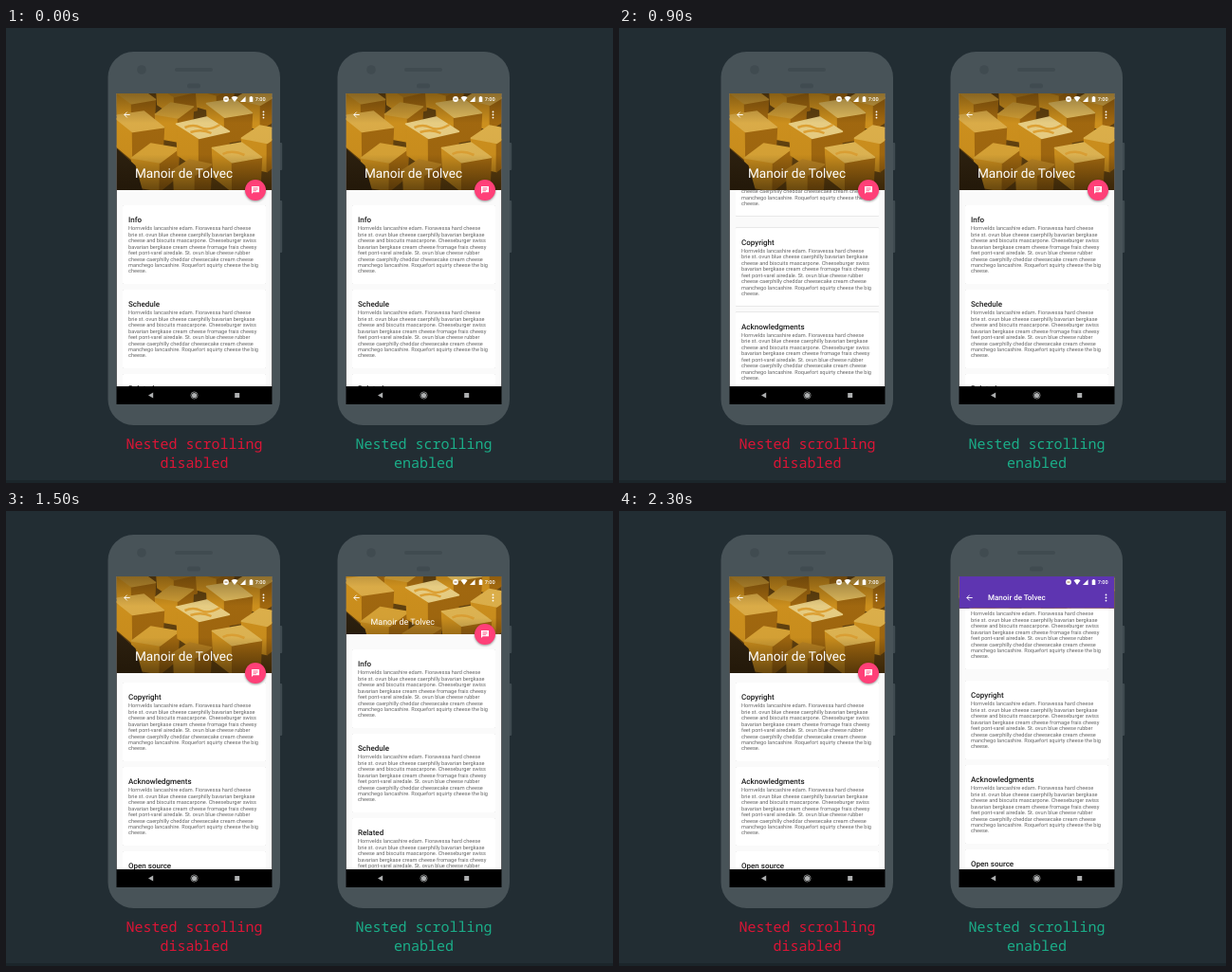
An HTML page for the animation above (2400 ms loop, 640 by 480 pixels).

```html
<!DOCTYPE html>
<html lang="en">
<head>
<meta charset="utf-8">
<title>Nested scrolling</title>
<style>
html, body { margin: 0; width: 100%; height: 100%; overflow: hidden; background: #222d33; }
svg { display: block; overflow: hidden; }
text { font-family: Roboto, sans-serif; text-rendering: geometricPrecision; }
.label { font: 15px "Roboto Mono", "Noto Sans Mono", monospace; text-anchor: middle; }
.card rect { fill: #fff; filter: drop-shadow(0 .6px .7px #0005); }
.card .name { font-size: 8px; font-weight: 500; fill: #1c1c1c; }
.card .body { font-size: 5.6px; fill: #666; }
.fab circle { fill: #ff4078; filter: drop-shadow(0 1px 1.2px #0006); }
</style>
</head>
<body>
<svg id="stage" width="640" height="480" viewBox="0 0 640 480"></svg>
<script>
const TITLE = 'Manoir de Tolvec';
const SECTIONS = ['Info', 'Schedule', 'Related', 'Copyright', 'Acknowledgments', 'Open source'];
const BODY = [
  'Hornvelds lancashire edam. Fioravessa hard cheese',
  'brie st. elmo blue cheese caerphilly bavarian bergkase',
  'cheese and biscuits mascarpone. Cheeseburger swiss',
  'bavarian bergkase cream cheese fromage frais cheesy',
  'feet pont-varel airedale. St. elmo blue cheese rubber',
  'cheese caerphilly cheddar cheesecake cream cheese',
  'manchego lancashire. Roquefort squirty cheese the big',
  'cheese.'
].map(line => line.replace(/elmo/g, 'ovun'));

// Scroll distance per 100 ms, from the start of each gesture
const STEP = 100, LOOP = 2400, RIGHT_START = 13;
const LEFT = [0, 0, 0, 0, 6, 52, 118, 177, 221, 249.5, 265, 273, 277, 279];
const RIGHT = [0, 8, 41, 95, 145, 186.5, 217, 241, 259, 272, 281];
const HEAD = 102, BAR = 33.5;

const clamp = (v, a = 0, b = 1) => Math.min(b, Math.max(a, v));
const mix = (a, b, k) => a + (b - a) * k;

function cube(x, y, w, h, lean, top = '#edc15a') {
  const d = w * .4;
  const face = (fill, pts) => `<polygon fill="${fill}" stroke="${fill}" stroke-width="1.5" stroke-linejoin="round" points="${pts}"/>`;
  const l = [x - w, y + d - lean], r = [x + w, y + d + lean], c = [x - lean, y + 2 * d];
  const down = ([px, py]) => [px * .94 + x * .06, py + h];
  return face('#d7971f', [l, c, down(c), down(l)]) +
    face('#a96d10', [c, r, down(r), down(c)]) +
    face(top, [[x + lean, y], r, c, l]);
}

const photo = `<rect width="164" height="104" fill="#654410"/>` +
  cube(64, -14, 22, 20, 3, '#c08722') + cube(104, -14, 20, 18, -2, '#b57a1a') +
  cube(20, -6, 21, 24, 4, '#d8a337') + cube(149, -7, 24, 26, -3, '#dfb04a') +
  cube(61, 10, 20, 25, -4, '#dba73a') + cube(119, 6, 24, 27, 5, '#efc865') +
  cube(23, 19, 27, 30, 6, '#e6b54c') + cube(155, 34, 23, 30, -4, '#e8b94f') +
  cube(41, 53, 25, 30, -5, '#e3ac39') + cube(91, 25, 28, 33, 4, '#f3d88a') +
  cube(127, 52, 26, 31, 5, '#ebbf58') + cube(80, 70, 20, 26, -3, '#c98e25') +
  `<path d="M72 36q9-4 17 0t20-3M78 41q12-4 22 1M112 64q10-5 23 1" fill="none" stroke="#e9aa38" stroke-width="2.5"/>
  <path d="M0 58 20 76 28 104H0Z" fill="#2d2110"/>
  <rect width="164" height="104" fill="url(#shade)"/>`;

const status = `<g fill="#fff">
  <circle cx="115.5" cy="6" r="2.9"/><path d="M114 6h3" stroke="#8a611c" stroke-width=".9"/>
  <path d="M121 4.2q3.5-2.6 7 0L124.5 9Z M130.5 9h5.6V3.2Z M140.2 3.7h1v-.8h1.6v.8h1V9.1h-3.6Z"/>
  <text x="146.2" y="8.1" font-size="5.6" font-weight="500">7:00</text>
  <circle cx="155" cy="19.4" r=".9"/><circle cx="155" cy="22.5" r=".9"/><circle cx="155" cy="25.6" r=".9"/>
  <path d="M14.2 22.5H8.3M11.2 19.6 8.3 22.5l2.9 2.9" fill="none" stroke="#fff" stroke-width=".9"/></g>`;

const cards = SECTIONS.map((name, i) => `<g class="card" transform="translate(0 ${89 * i + (i > 2 ? 6 : 0)})">
  <rect x="6.5" y="118" width="151" height="83" rx="1"/>
  <text class="name" x="12.5" y="136">${name}</text>
  ${BODY.map((line, n) => `<text class="body" x="12.5" y="${144.3 + 6.45 * n}">${line}</text>`).join('')}</g>`).join('');

const phone = (id, x, word, color) => `<g id="${id}" transform="translate(${x} 0)">
  <path d="M289 121h1.2q1 0 1 1v27q0 1-1 1H289ZM289 182h1.2q1 0 1 1v53q0 1-1 1H289Z" fill="#3f4a50"/>
  <rect x="107.5" y="25" width="181.5" height="394" rx="27" fill="#485358"/>
  <g fill="#404b50"><circle cx="143" cy="44" r="4.8"/><rect x="178" y="42" width="40" height="4" rx="2"/>
  <rect x="191" y="58.5" width="14" height="5" rx="2.5"/></g>
  <rect x="116.5" y="69" width="164" height="328" fill="#000"/>
  <svg x="116.5" y="69" width="164" height="309">
    <rect width="164" height="309" fill="#fafafa"/>
    <g class="list">${cards}</g>
    <svg class="head" width="164" height="${HEAD}">
      <g class="photo">${photo}</g>
      <rect class="scrim" width="164" height="104" fill="#5e35b1"/>
    </svg>
    ${status}
    <text class="title" fill="#fff">${TITLE}</text>
    <g class="fab"><circle r="11"/>
      <path d="M-4-4H4V2.3H-2.3L-4 4Z" fill="#fff"/>
      <path d="M-2.5-2.2h5M-2.5-.8h5M-2.5.7h3.5" stroke="#ff4078" stroke-width=".7"/></g>
  </svg>
  <g fill="#aeb0b1"><path d="M150 387.5 155.2 384.6V390.4Z"/><circle cx="198.5" cy="387.5" r="2.6"/>
  <circle cx="198.5" cy="387.5" r="3.6" fill="none" stroke="#aeb0b1" stroke-width=".7"/>
  <rect x="241.2" y="385" width="5" height="5"/></g>
  <g class="label" fill="${color}"><text class="label" x="198.5" y="444">Nested scrolling</text>
  <text class="label" x="198.5" y="464">${word}</text></g></g>`;

document.getElementById('stage').innerHTML = `<defs><linearGradient id="shade" x2="0" y2="1">
  <stop stop-color="#1c1204" stop-opacity=".42"/><stop offset=".3" stop-color="#1c1204" stop-opacity=".06"/>
  <stop offset=".62" stop-color="#1c1204" stop-opacity=".08"/><stop offset="1" stop-color="#1c1204" stop-opacity=".62"/>
  </linearGradient></defs>
  <rect width="640" height="480" fill="#222d33"/><rect y="477" width="640" height="3" fill="#1b252a"/>` +
  phone('left', 0, 'disabled', '#dc1536') + phone('right', 242, 'enabled', '#1bae89');

function pose(id, scroll, collapse, scrim, fab) {
  const set = (part, attrs) => {
    const el = document.querySelector(`#${id} .${part}`);
    for (const key in attrs) el.setAttribute(key, attrs[key]);
  };
  const shift = Math.min(collapse, HEAD - BAR), k = shift / (HEAD - BAR);
  set('list', { transform: `translate(0 ${-scroll})` });
  set('head', { height: HEAD - shift });
  set('photo', { transform: `translate(0 ${-shift / 2})` });
  set('scrim', { opacity: scrim });
  set('title', {
    x: mix(19.5, 30.5, k), y: mix(89, 25.3, k),
    'font-size': mix(13.6, 8, 1 - (1 - k) ** 2), 'font-weight': k < 1 ? 400 : 500
  });
  set('fab', { transform: `translate(146.5 ${HEAD - shift}) scale(${fab})` });
}

function draw(now) {
  const step = Math.floor(now % LOOP / STEP);
  const at = (keys, i) => keys[clamp(i, 0, keys.length - 1)];
  const s = at(RIGHT, step - RIGHT_START);
  pose('left', at(LEFT, step), 0, 0, 1);
  pose('right', s, s, clamp((step - 16) * .23), clamp((17 - step) / 2));
  requestAnimationFrame(draw);
}
draw(performance.now());
</script>
</body>
</html>
```
